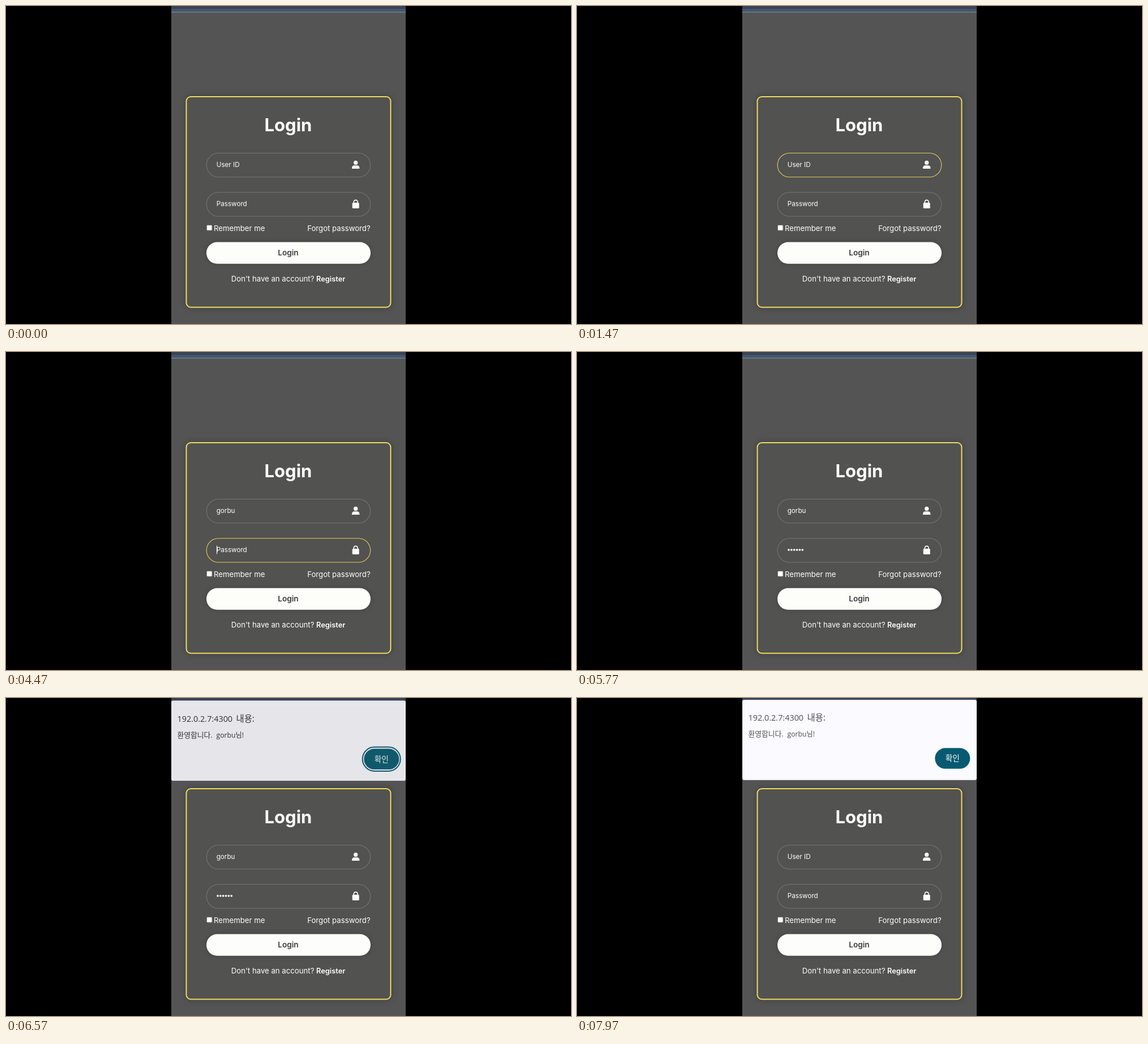
An HTML page for the animation above (8 s loop, 998 by 561 pixels).

```html
<!DOCTYPE html>
<html lang="en">
<head>
<meta charset="utf-8">
<title>Login form</title>
<style>
  html, body { margin: 0; width: 100%; height: 100%; overflow: hidden; background: #000; }
  svg { display: block; font-family: Inter, "Open Sans", sans-serif; fill: #fff; }
  .field { fill: none; stroke: #74746d; stroke-width: 1.1; }
  .input { font-size: 11.7px; }
  .small { font-size: 13.2px; }
  .card { fill: #525251; stroke: #f0da5e; stroke-width: 2; filter: drop-shadow(0 0 6px #0004); }
  .submit { fill: #fdfdfa; filter: drop-shadow(0 0 4px #0003); }
  #dialog { font-family: "Open Sans", "Noto Sans CJK KR", "Noto Sans CJK JP", "Noto Sans CJK", sans-serif; }
</style>
</head>
<body>
<svg width="998" height="561" viewBox="0 0 998 561">
  <rect width="998" height="561" fill="#000"/>
  <rect x="292" width="414" height="561" fill="#545455"/>
  <rect x="292" width="414" height="5" fill="#3b4352"/>
  <rect x="292" y="5" width="414" height="5" fill="#455670"/>
  <rect x="292" y="10" width="414" height="1.5" fill="#66848c"/>

  <rect class="card" x="318.5" y="160" width="361" height="371.5" rx="8"/>
  <text x="498.5" y="221" text-anchor="middle" font-size="31" font-weight="700">Login</text>

  <rect id="userBox" class="field" x="354.2" y="259.5" width="289.5" height="42.3" rx="21.1"/>
  <text id="user" class="input" x="371.7" y="284"></text>
  <circle cx="617.7" cy="276.4" r="3.6"/>
  <path d="M611 287v-1.2q0-4.6 4.6-4.6h4.2q4.6 0 4.6 4.6v1.2z"/>

  <rect id="passBox" class="field" x="354.2" y="328.7" width="289.5" height="42.3" rx="21.1"/>
  <text id="hint" class="input" x="371.7" y="353">Password</text>
  <path id="dots" fill="none" stroke="#fff" stroke-width="3.7" stroke-linecap="round" stroke-dasharray="0 4.85"/>
  <rect x="611.7" y="347" width="12" height="10" rx="1.6"/>
  <path d="M614.3 348v-2.2a3.4 3.4 0 0 1 6.8 0v2.2" fill="none" stroke="#fff" stroke-width="1.6"/>

  <rect id="caret" width="1" height="15"/>

  <rect x="354.5" y="386.5" width="9.5" height="9.5" rx="1.6" stroke="#767676"/>
  <text class="small" x="367" y="397">Remember me</text>
  <text class="small" x="643.7" y="397" text-anchor="end">Forgot password?</text>

  <rect class="submit" x="354" y="416.5" width="290" height="38.3" rx="19.1"/>
  <text x="498.5" y="439.5" text-anchor="middle" font-size="13.6" font-weight="600" fill="#3a3a3a">Login</text>
  <text class="small" x="498.5" y="485.5" text-anchor="middle">Don't have an account? <tspan font-weight="600" font-size="12.8">Register</tspan></text>

  <g id="dialog">
    <rect x="292" y="7" width="414" height="141.5" rx="3" fill="#fafaff"/>
    <g id="message" fill="#2e2e30">
      <text x="302.5" y="44" font-size="14.4">192.0.2.7:4300</text>
      <text x="406.5" y="44" font-size="15.4">내용:</text>
      <text x="302.5" y="72" font-size="12.8">환영합니다.</text>
      <text x="371.5" y="72" font-size="12.2">gorbu님!</text>
    </g>
    <rect id="ring" x="629.7" y="89" width="67" height="42.3" rx="21.1" fill="none" stroke="#075a70" stroke-width="2"/>
    <rect x="632.3" y="92" width="62" height="36.5" rx="18.2" fill="#075a70"/>
    <text x="663.3" y="115" font-size="13.6" text-anchor="middle">확인</text>
  </g>
</svg>
<script>
const LOOP = 8000, BLINK = 530, CLEAR = 7930, NAME = "gorbu";
const userKeys = [1930, 2130, 2300, 2500, 2770];
const passKeys = [4730, 4830, 4930, 5030, 5130, 5240];
const userFocus = 930, passFocus = 3370, passBlur = 5600;

const el = id => document.getElementById(id);
const [userBox, user, passBox, hint, dots, caret, dialog, message, ring] =
  ["userBox", "user", "passBox", "hint", "dots", "caret", "dialog", "message", "ring"].map(el);
const clamp = v => Math.max(0, Math.min(1, v));
const show = (node, on) => node.setAttribute("visibility", on ? "visible" : "hidden");
const typed = (keys, t) => t < CLEAR ? keys.filter(k => k <= t).length : 0;

// Border fades between grey and yellow over a short transition.
function drawBorder(box, t, on, off) {
  const f = clamp((t - on) / 70) - clamp((t - off) / 60);
  const mix = (a, b) => Math.round(a + (b - a) * f);
  box.style.stroke = `rgb(${mix(116, 226)},${mix(116, 205)},${mix(109, 88)})`;
}

function drawCaret(t, letters, count) {
  const inUser = t < passFocus;
  const last = Math.max(...[userFocus, passFocus, ...userKeys, ...passKeys].filter(k => k <= t));
  show(caret, t >= userFocus && t < 5770 && Math.floor((t - last) / BLINK) % 2 === 0);
  const width = inUser ? (letters ? user.getComputedTextLength() : 0) : count * 4.85;
  caret.setAttribute("x", 372 + width);
  caret.setAttribute("y", inUser ? 272.5 : 341.5);
}

function drawDialog(t) {
  const open = clamp((t - 6395) / 200), close = clamp((t - CLEAR) / 200);
  show(dialog, t >= 6430);
  show(ring, t >= 6430 && t < 7600);
  dialog.setAttribute("transform", `translate(0 ${-20 * (1 - open) - 18 * close})`);
  dialog.setAttribute("opacity", open);
  message.setAttribute("opacity", 1 - 0.8 * close);
}

function draw(t) {
  const letters = typed(userKeys, t), count = typed(passKeys, t);
  user.textContent = letters ? NAME.slice(0, letters) : "User ID";
  show(hint, !count);
  show(dots, count);
  dots.setAttribute("d", `M374 349h${Math.max(0, count - 1) * 4.85 + 0.1}`);
  drawBorder(userBox, t, userFocus, passFocus);
  drawBorder(passBox, t, passFocus, passBlur);
  drawCaret(t, letters, count);
  drawDialog(t);
}

const start = performance.now();
function tick() {
  draw((performance.now() - start) % LOOP);
  requestAnimationFrame(tick);
}
tick();
</script>
</body>
</html>
```
